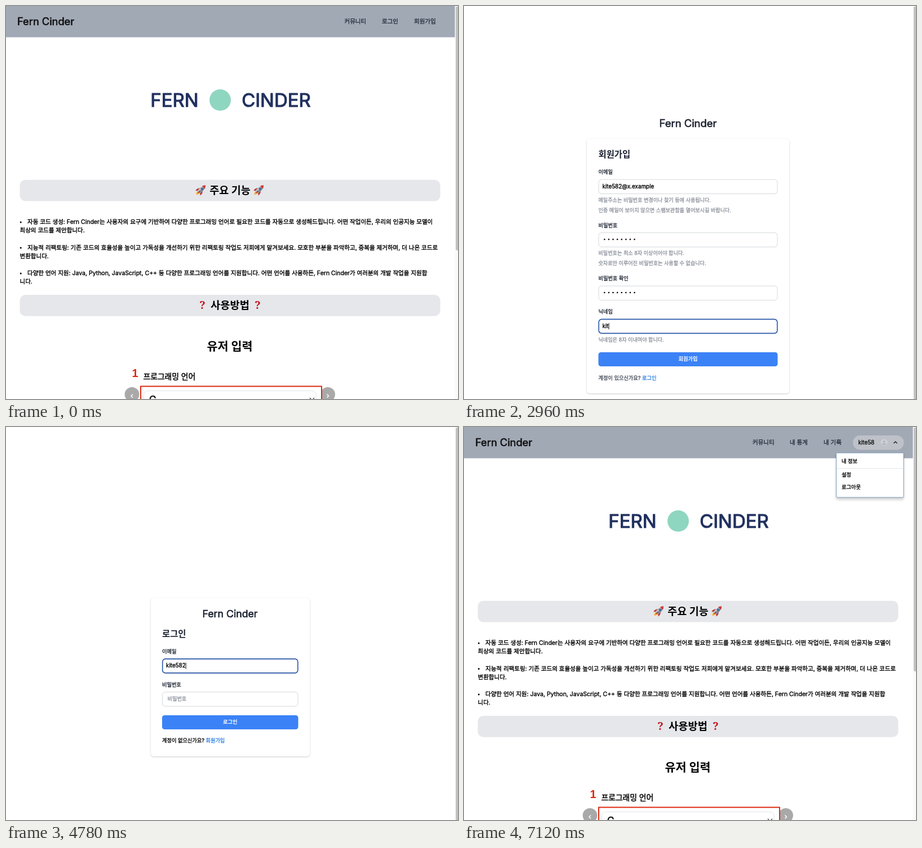
An HTML page with a canvas that plays this animation: 802 px wide and 698 px high, repeating every 7540 ms.

```html
<!DOCTYPE html>
<html lang="ko">
<head>
<meta charset="utf-8">
<title>Fern Cinder</title>
<style>
  html, body { margin: 0; width: 100%; height: 100%; overflow: hidden; background: #fff; }
  canvas { display: block; width: 802px; height: 698px; }
</style>
</head>
<body>
<canvas id="stage"></canvas>
<script>
const W = 802, H = 698, LOOP = 7540, BLINK = 160;
const FONT = 'Inter, "Noto Sans CJK KR", "Noto Sans CJK", sans-serif';
const BRAND = 'Fern Cinder', EMAIL = 'kite582@x.example', NICK = 'kite58';
const INK = '#1b2130', MUTED = '#8d929c', LINE = '#d5d8dd', BLUE = '#3b82f6', RING = '#2855a6';

const canvas = document.getElementById('stage');
const ctx = canvas.getContext('2d');
const dpr = window.devicePixelRatio || 1;
canvas.width = W * dpr;
canvas.height = H * dpr;

// Text is placed by the middle of its line; returns the width.
// Medium weight is regular with a thin outline, so both scripts look alike.
function text(str, x, midY, size, color = '#000', weight = 500, align = 'left', font = FONT) {
  const medium = weight === 500;
  const y = midY + size * 0.37;
  ctx.font = `${medium ? 400 : weight} ${size}px ${font}`;
  ctx.textAlign = align;
  ctx.fillStyle = color;
  ctx.fillText(str, x, y);
  if (medium) {
    ctx.strokeStyle = color;
    ctx.lineWidth = size * 0.035;
    ctx.lineJoin = 'round';
    ctx.strokeText(str, x, y);
  }
  return ctx.measureText(str).width;
}

function rect(x, y, w, h, color) {
  ctx.fillStyle = color;
  ctx.fillRect(x, y, w, h);
}

function box(x, y, w, h, r, fill, stroke, lineWidth = 1) {
  ctx.beginPath();
  ctx.roundRect(x, y, w, h, r);
  if (fill) { ctx.fillStyle = fill; ctx.fill(); }
  if (stroke) { ctx.strokeStyle = stroke; ctx.lineWidth = lineWidth; ctx.stroke(); }
}

function disc(x, y, r, color) {
  ctx.beginPath();
  ctx.arc(x, y, r, 0, Math.PI * 2);
  ctx.fillStyle = color;
  ctx.fill();
}

function polyline(points, color, width) {
  ctx.beginPath();
  points.forEach(([x, y]) => ctx.lineTo(x, y));
  ctx.strokeStyle = color;
  ctx.lineWidth = width;
  ctx.stroke();
}

function withShadow(blur, offsetY, alpha, draw) {
  ctx.save();
  ctx.shadowColor = `rgba(0,0,0,${alpha})`;
  ctx.shadowBlur = blur * dpr;
  ctx.shadowOffsetY = offsetY * dpr;
  draw();
  ctx.restore();
}

function scrollbar(height) {
  rect(796, 0, 6, H, '#fafafa');
  box(798, 1, 5, height, 2, '#c1c1c1');
}

const ramp = (t, from, to) => {
  const k = Math.min(1, Math.max(0, (t - from) / (to - from)));
  return k * k * (3 - 2 * k);
};

/* ---------- landing page ---------- */

function rocket(x, y) {
  ctx.save();
  ctx.translate(x, y);
  ctx.rotate(Math.PI / 4);
  const shape = (color, path) => { ctx.fillStyle = color; ctx.fill(new Path2D(path)); };
  shape('#f6a623', 'M-2.4 5 Q-3 9 0 12 Q3 9 2.4 5Z');
  shape('#ffe06a', 'M-1.2 5 Q-1.4 8 0 9.5 Q1.4 8 1.2 5Z');
  shape('#c3342f', 'M-3 -1 Q-7 2 -6 8 L-2.5 5Z M3 -1 Q7 2 6 8 L2.5 5Z');
  shape('#b9c3cd', 'M0 -11 Q5.5 -4 3 6 H-3 Q-5.5 -4 0 -11Z');
  shape('#7f8d9b', 'M0 -11 Q5.5 -4 3 6 H0Z');
  shape('#cf3a33', 'M0 -11.5 Q2.8 -8.5 3.4 -6 H-3.4 Q-2.8 -8.5 0 -11.5Z');
  disc(0, -2.5, 2, '#24405f');
  disc(0, -2.5, 1.2, '#5aa3dc');
  shape('#a92823', 'M-.7 2 H.7 V8 H-.7Z');
  ctx.restore();
}

const FEATURES = [
  [383.5, `자동 코드 생성: ${BRAND}는 사용자의 요구에 기반하여 다양한 프로그래밍 언어로 필요한 코드를 자동으로 생성해드립니다. 어떤 작업이든, 우리의 인공지능 모델이`, '최상의 코드를 제안합니다.'],
  [429, '지능적 리팩토링: 기존 코드의 효율성을 높이고 가독성을 개선하기 위한 리팩토링 작업도 저희에게 맡겨보세요. 모호한 부분을 파악하고, 중복을 제거하며, 더 나은 코드로', '변환합니다.'],
  [474.5, `다양한 언어 지원: Java, Python, JavaScript, C++ 등 다양한 프로그래밍 언어를 지원합니다. 어떤 언어를 사용하든, ${BRAND}가 여러분의 개발 작업을 지원합`, '니다.'],
];

function sliderButton(x, dir) {
  disc(x, 690, 13, '#a9a9a9');
  polyline([[x - dir * 1.5, 689.5], [x + dir * 1.5, 692.5], [x - dir * 1.5, 695.5]], '#fff', 1.5);
}

function landing() {
  scrollbar(433);
  rect(0, 0, 796.5, 55.5, '#a1a9b5');
  text(BRAND, 20, 27, 18.3, '#111');

  text('FERN', 299, 167, 33, '#20305f', 500, 'center');
  disc(380, 167, 19, '#8fd6c0');
  text('CINDER', 479.5, 167, 33, '#20305f', 500, 'center');

  box(24.5, 308.7, 746, 37.7, 10, '#e5e7eb');
  text('주요 기능', 397.5, 327, 18.5, '#000', 700, 'center');
  rocket(346, 326.5);
  rocket(449, 326.5);

  for (const [y, first, second] of FEATURES) {
    disc(26.2, y + 0.5, 1.5, '#000');
    text(first, 38, y, 10.5);
    text(second, 24.5, y + 15, 10.5);
  }

  box(24.5, 513, 746, 37.7, 10, '#e5e7eb');
  text('사용방법', 397.5, 531, 18.7, '#000', 700, 'center');
  for (const x of [348.5, 446.5])
    text('?', x, 530.5, 19, '#c4161c', 700, 'center', '"Noto Serif", serif');

  text('유저 입력', 397, 604.5, 20.7, '#000', 700, 'center');
  text('1', 229, 651.5, 20, '#e0260b', 700, 'center', '"Liberation Sans", sans-serif');
  text('프로그래밍 언어', 243.5, 658, 13.8);

  sliderButton(223.5, -1);
  sliderButton(571, 1);
  box(239, 675.5, 321, 60, 0, '#fff', '#dc2a12', 2);
  box(244.5, 683.5, 305.5, 40, 7, '#fff', '#e0e2e6');
  text('C', 254, 698.5, 17);
  polyline([[539, 696], [543, 700], [547, 696]], '#333', 1.2);
}

function navItems(items) {
  for (const [label, x] of items) text(label, x, 27, 10.5, '#2b3340');
}

function guestHome() {
  landing();
  navItems([['커뮤니티', 600.5], ['로그인', 667], ['회원가입', 724]]);
}

function userMenu() {
  withShadow(5, 4, 0.2, () => box(660.5, 46, 119.5, 79, 1, '#fff'));
  box(660.5, 46, 119.5, 79, 1, '#fff', '#7d9bba');
  rect(661, 73, 118.5, 1, '#e3e5e8');
  text('내 정보', 670, 61, 9.25);
  text('설정', 670, 84.5, 9.25);
  text('로그아웃', 670, 107, 9.25);
}

function memberHome(t) {
  landing();
  navItems([['커뮤니티', 512], ['내 통계', 578], ['내 기록', 638]]);

  ctx.globalAlpha = ramp(t, 6800, 6880);
  box(690, 15, 90.5, 25.5, 12.75, '#bfc1c9');
  ctx.globalAlpha = 1;
  text(NICK, 699.5, 27, 9.9, '#111');
  disc(745.5, 27.5, 6, '#d0d2d9');
  disc(745.5, 25.7, 2.2, '#b4b7c0');
  box(741.7, 28.8, 7.6, 3.2, 1.6, '#b4b7c0');
  const tip = t < 6860 ? 1.5 : -1.5;
  polyline([[762.5, 27.5 - tip], [765.5, 27.5 + tip], [768.5, 27.5 - tip]], '#111', 1.2);

  ctx.globalAlpha = ramp(t, 6850, 7060);
  if (ctx.globalAlpha > 0) userMenu();
  ctx.globalAlpha = 1;
}

/* ---------- forms ---------- */

// keys: [start, end, count] bursts of typing
const SIGNUP = {
  x: 238.5, w: 318, card: [218, 236, 359, 452], brandY: 208, brandSize: 18.4,
  heading: '회원가입', headingY: 263, buttonY: 615,
  question: '계정이 있으신가요?', questionColor: '#454c59', link: '로그인', linkY: 660.5,
  fields: [
    { label: '이메일', y: 308, value: EMAIL, focus: 460, keys: [[780, 1460, 13], [1620, 1740, 4]],
      hints: ['메일주소는 비밀번호 변경이나 찾기 등에 사용됩니다.', '인증 메일이 보이지 않으면 스팸보관함을 열어보시길 바랍니다.'] },
    { label: '비밀번호', y: 402.5, focus: 1860, keys: [[2020, 2100, 3], [2160, 2280, 5]],
      hints: ['비밀번호는 최소 8자 이상이어야 합니다.', '숫자로만 이루어진 비밀번호는 사용할 수 없습니다.'] },
    { label: '비밀번호 확인', y: 497, focus: 2340, keys: [[2420, 2700, 8]], hints: [] },
    { label: '닉네임', y: 556, value: NICK, focus: 2780, keys: [[2860, 3080, 6]],
      hints: ['닉네임은 8자 이내여야 합니다.'] },
  ],
};

const LOGIN = {
  x: 277, w: 241.5, card: [257, 304, 282, 281], brandY: 331.5, brandSize: 17.7,
  heading: '로그인', headingY: 367, buttonY: 512,
  question: '계정이 없으신가요?', questionColor: '#000', link: '회원가입', linkY: 557,
  fields: [
    { label: '이메일', y: 411.5, value: EMAIL, focus: 4200,
      keys: [[4520, 4780, 7], [5080, 5220, 6], [5360, 5480, 4]], hints: [] },
    { label: '비밀번호', y: 470.5, focus: 5580, keys: [[5740, 6000, 8]], hints: [] },
  ],
};

function typedCount(keys, t) {
  return keys.reduce((sum, [a, b, n]) => {
    if (t < a) return sum;
    return sum + (t >= b ? n : 1 + Math.floor((t - a) / (b - a) * (n - 1)));
  }, 0);
}

function caretVisible({ focus, keys }, t) {
  if (t < focus) return false;
  if (keys.some(([a, b]) => t >= a && t < b)) return true;
  const since = keys.reduce((last, [, b]) => (b <= t ? b : last), focus);
  return (t - since) % (2 * BLINK) < BLINK;
}

function drawField(form, field, active, t) {
  const { x, w } = form, { y, value } = field;
  const mid = y + 12, start = x + 7;
  const count = typedCount(field.keys, t);
  text(field.label, x, y - 13, 9.2, INK);
  if (active) box(x + 0.7, y + 0.4, w - 1.4, 25, 5, '#fff', RING, 1.6);
  else box(x + 0.5, y + 0.2, w - 1, 25.3, 5, '#fff', LINE);

  let caretX = start;
  if (!count) {
    text(field.label, start + 2.5, mid, 9.2, MUTED);
  } else if (value) {
    caretX += text(value.slice(0, count), start, mid, 9.9);
  } else {
    for (let i = 0; i < count; i++) disc(start + 3.8 + i * 7.6, mid, 1.3, '#000');
    caretX += count * 7.6;
  }
  if (active && caretVisible(field, t)) rect(caretX, y + 7, 1, 11.5, '#222');
  field.hints.forEach((hint, i) => text(hint, x, y + 36.5 + i * 17.7, 9.1, MUTED));
}

function drawForm(form, t) {
  const { x, w, card, fields, linkY } = form;
  withShadow(3, 1, 0.2, () => box(...card, 5, '#fff'));
  text(BRAND, 397.5, form.brandY, form.brandSize, INK, 500, 'center');
  text(form.heading, x, form.headingY, 15.4, INK, 700);

  const focused = fields.reduce((last, f) => (f.focus <= t ? f : last), fields[0]);
  fields.forEach(f => drawField(form, f, f === focused, t));

  box(x, form.buttonY, w, 25, 4.5, BLUE);
  text(form.heading, x + w / 2, form.buttonY + 12, 9.25, '#fff', 700, 'center');
  const width = text(form.question, x, linkY, 9.2, form.questionColor);
  text(form.link, x + width + 2.6, linkY, 9.2, '#3180e2');
  scrollbar(H);
}

/* ---------- timeline ---------- */

const SCENES = [
  [340, guestHome],
  [3420, t => drawForm(SIGNUP, t)],
  [3980, guestHome],
  [6300, t => drawForm(LOGIN, t)],
  [LOOP, memberHome],
];

function frame() {
  const t = performance.now() % LOOP;
  ctx.setTransform(dpr, 0, 0, dpr, 0, 0);
  rect(0, 0, W, H, '#fff');
  SCENES.find(([end]) => t < end)[1](t);
  requestAnimationFrame(frame);
}
frame();
</script>
</body>
</html>
```
